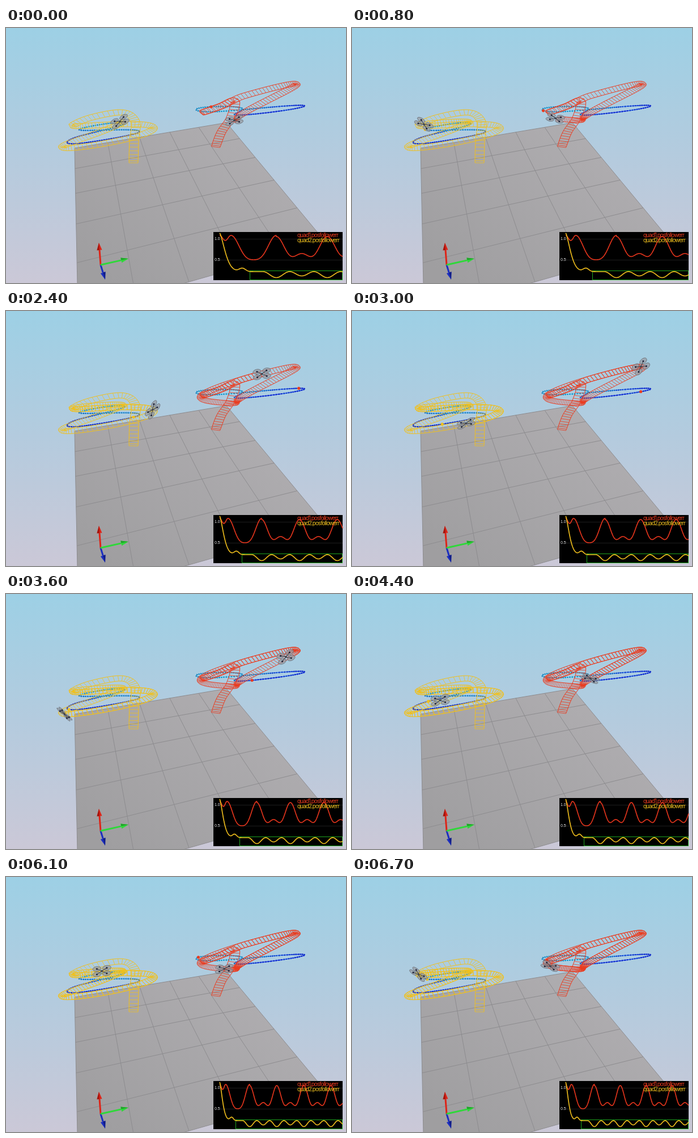
These frames come from a looping animation (600x450 px, 6.8 s). An HTML page with a canvas:

```html
<!DOCTYPE html>
<html lang="en">
<head>
<meta charset="utf-8">
<title>Quadrotor position following</title>
<style>
html, body { margin: 0; width: 100%; height: 100%; overflow: hidden; }
canvas { display: block; width: 600px; height: 450px; }
</style>
</head>
<body>
<canvas id="stage" width="600" height="450"></canvas>
<script>
const LOOP = 6800, STEP = 100, LAP = 5.72, TAU = Math.PI * 2;
const RED = '#ea3c20', YELLOW = '#f0c01e';
const view = document.getElementById('stage').getContext('2d');
const backdrop = document.createElement('canvas');
backdrop.width = 600;
backdrop.height = 450;
let g = backdrop.getContext('2d');

// Smooth closed path through points evenly spaced in time.
function closedPath(points) {
  const n = points.length;
  return t => {
    let x = 0, y = 0;
    points.forEach((p, i) => {
      const h = Math.PI * (t / LAP - i / n), s = Math.sin(h);
      const w = Math.abs(s) < 1e-6 ? 1 : Math.sin(n * h) * Math.cos(h) / (n * s);
      x += w * p[0];
      y += w * p[1];
    });
    return [x, y];
  };
}

// Open spline through points, u counts points.
function openPath(points, u) {
  const at = i => points[Math.max(0, Math.min(points.length - 1, i))];
  const i = Math.floor(u), s = u - i;
  const [p, a, b, q] = [at(i - 1), at(i), at(i + 1), at(i + 2)];
  return [0, 1].map(k => a[k] + s / 2 * (b[k] - p[k]
    + s * (2 * p[k] - 5 * a[k] + 4 * b[k] - q[k]
    + s * (3 * (a[k] - b[k]) + q[k] - p[k]))));
}

// A craft climbs along "climb" and joins its lap at time "join".
function craft(color, climb, join, lapPoints, refPoints) {
  const lap = closedPath(lapPoints);
  const points = [...climb, lap(join), lap(join + .3)];
  const start = join - climb.length * .3;
  const pos = t => t < join ? openPath(points, (t - start) / .3) : lap(t);
  return { color, start, pos, lap, ref: closedPath(refPoints) };
}

const yellowCraft = craft(YELLOW,
  [[225, 238], [226, 200], [228, 165], [205, 149], [150, 158]], 1.1 - LAP,
  [[201, 165], [134, 169], [134, 173], [237, 170], [227, 192], [105, 212], [143, 192], [200, 170]],
  [[195, 167], [131, 178], [178, 180], [236, 183], [176, 197], [112, 204], [126, 192], [193, 175]]);
const redCraft = craft(RED,
  [[370, 210], [380, 184], [397, 158], [404, 128], [378, 138], [344, 150], [380, 138]], 2.145 - LAP,
  [[403, 163], [364, 160], [347, 148], [416, 121], [502, 99], [496, 110], [428, 145], [408, 161]],
  [[362, 139], [336, 145], [382, 147], [488, 138], [521, 140], [437, 152], [405, 151], [415, 141]]);

function line(points, color, width) {
  g.beginPath();
  points.forEach(p => g.lineTo(p[0], p[1]));
  g.strokeStyle = color;
  g.lineWidth = width;
  g.stroke();
}

function fillPoly(points, color) {
  g.beginPath();
  points.forEach(p => g.lineTo(p[0], p[1]));
  g.closePath();
  g.fillStyle = color;
  g.fill();
}

function dot([x, y], r, color) {
  g.beginPath();
  g.arc(x, y, r, 0, TAU);
  g.fillStyle = color;
  g.fill();
}

// Floor square seen in perspective, u to the right and v to the front.
function floorPoint(u, v) {
  const w = 1 + .1201 * u - .4364 * v;
  return [(121 + 314.7 * u - 49.4 * v) / w, (212 - 24.9 * u + 72 * v) / w];
}

function drawFloor() {
  const shade = g.createLinearGradient(400, 167, 180, 450);
  shade.addColorStop(0, '#afadb0');
  shade.addColorStop(1, '#9f9ea0');
  fillPoly([floorPoint(0, 0), floorPoint(1, 0), floorPoint(1, 1), floorPoint(0, 1)], shade);
  for (let k = 0; k < 1.1; k += .2) {
    line([floorPoint(k, 0), floorPoint(k, 1)], '#8d8c8f', 1);
    line([floorPoint(0, k), floorPoint(1, k)], '#8d8c8f', 1);
  }
}

function arrow(x, y, tipX, tipY, color, dark) {
  const len = Math.hypot(tipX - x, tipY - y);
  const dx = (tipX - x) / len, dy = (tipY - y) / len;
  const bx = tipX - dx * 13, by = tipY - dy * 13;
  line([[x, y], [bx, by]], color, 3);
  fillPoly([[tipX, tipY], [bx - dy * 4.5, by + dx * 4.5], [bx + dy * 4.5, by - dx * 4.5]], color);
  fillPoly([[tipX, tipY], [bx, by], [bx + dy * 4.5, by - dx * 4.5]], dark);
}

// Dotted reference lap, from cyan to blue.
function reference(path, blueness) {
  let last = path(0), gap = 0;
  for (let i = 1; i <= 500; i++) {
    const p = path(i / 500 * LAP);
    const k = Math.max(0, Math.min(1, blueness(...p)));
    line([last, p], `rgb(${70 - 50 * k},${215 - 160 * k},${250 - 20 * k})`, 1.7);
    gap += Math.hypot(p[0] - last[0], p[1] - last[1]);
    if (gap > 3.4) {
      dot(p, 1.2, k > .5 ? '#0b1fb4' : '#0a4f98');
      gap = 0;
    }
    last = p;
  }
}

function drawBackdrop() {
  const sky = g.createLinearGradient(0, 0, 0, 450);
  sky.addColorStop(0, '#9dd0e5');
  sky.addColorStop(.5, '#b4cbde');
  sky.addColorStop(1, '#cbc8d7');
  g.fillStyle = sky;
  g.fillRect(0, 0, 600, 450);
  drawFloor();
  reference(redCraft.ref, (x, y) => (x - 410) / 110 + (x > 403 && y > 146 ? .6 : 0));
  reference(yellowCraft.ref, (x, y) => (y - 176) / 14);
  arrow(167, 418, 175, 444, '#1c2ec0', '#101c86');
  arrow(167, 418, 164, 379, '#dd2418', '#a4150e');
  arrow(167, 418, 216, 407, '#2fd83a', '#1ea628');
}

// Wing tips left behind: rungs lie across the heading, flattened by the view.
function trail({ color, start, pos }, now) {
  const flat = .6, left = [], right = [];
  for (let t = start; t <= now; t += .045) {
    const [x, y] = pos(t), [x2, y2] = pos(t + .02);
    const vx = (x2 - x) / .02, vy = (y2 - y) / .02 / flat;
    const k = 8.5 / (Math.hypot(vx, vy) + 10);
    left.push([x - vy * k, y + vx * k * flat]);
    right.push([x + vy * k, y - vx * k * flat]);
  }
  line(left, color, 1);
  line(right, color, 1);
  left.forEach((p, i) => line([p, right[i]], color, .8));
}

// The rotor plane leans into the acceleration.
function drone({ lap }, t, size) {
  const h = .35, [x, y] = lap(t), p = lap(t - h), q = lap(t + h);
  const ax = (p[0] + q[0] - 2 * x) / h / h * .0025;
  const ay = (p[1] + q[1] - 2 * y) / h / h * .0025;
  const nx = ax, ny = ay - .85, nz = .5 + .8 * ay;
  const side = Math.hypot(nx, ny), tilt = nz / Math.hypot(side, nz);
  const long = [-ny / side, nx / side], short = [nx / side * tilt, ny / side * tilt];
  const arm = angle => [0, 1].map(k =>
    size * (Math.cos(angle) * long[k] + Math.sin(angle) * short[k]));
  const a = arm(.7), b = arm(.7 + TAU / 4);
  for (let i = 0; i < 4; i++) {
    const [dx, dy] = arm(.7 + i * TAU / 4), hub = [x + dx, y + dy];
    g.save();
    g.transform(...a, ...b, ...hub);
    g.beginPath();
    g.arc(0, 0, .6, 0, TAU);
    g.restore();
    g.fillStyle = 'rgba(152,157,165,.75)';
    g.fill();
    g.strokeStyle = '#666a71';
    g.lineWidth = .8;
    g.stroke();
    line([[x, y], hub], '#4a4e56', 1.1);
    dot(hub, 1.5, '#1d2238');
  }
  dot([x, y], 2, '#454953');
}

const beat = u => (u - 1) / .9 * TAU;
const wave = (a, main, twice) => 391.5 - main * Math.cos(a) - twice * Math.cos(2 * a);

function errRed(u) {
  if (u < .2) return 370.5 - 4.5 * Math.cos(u / .2 * TAU);
  return u < 1 ? wave((u - .2) / .8 * TAU, 21.5, 4) : wave(beat(u), 15, 8.5);
}

function errYellow(u) {
  if (u < .78) return 430 - 68 * Math.exp(-((u / .13) ** 1.5)) - 6 * Math.exp(-(((u - .4) / .08) ** 2));
  return 434.5 + 4.5 * Math.cos(2 * beat(u)) + 1.5 * Math.cos(beat(u));
}

function label(text, x, y, color, font, spacing) {
  g.font = font;
  g.letterSpacing = spacing;
  g.fillStyle = color;
  g.fillText(text, x, y);
}

// The time axis shrinks as more data comes in.
function chart(t) {
  const unit = 100 / (1 + .145 * t);
  g.fillStyle = '#000';
  g.fillRect(366, 360, 228, 85);
  for (const y of [372.5, 409.5]) line([[378, y], [594, y]], '#1d1d1d', 1);
  const plot = (f, color) => {
    const points = [];
    for (let x = 377; x <= 594; x += .5) points.push([x, f((x - 377) / unit)]);
    line(points, color, 1.7);
  };
  const left = Math.round(377 + .53 * unit) + .5;
  g.strokeStyle = '#1fa51f';
  g.lineWidth = 1;
  g.strokeRect(left, 428.5, 593.5 - left, 16);
  plot(errRed, '#e0341c');
  plot(errYellow, '#e8b81c');
  const small = '7px "Liberation Sans", Arial, sans-serif';
  const legend = '10px Inter, sans-serif';
  label('1.0', 368, 374, '#e8e8e8', small, '0px');
  label('0.5', 368, 411, '#e8e8e8', small, '0px');
  label('quad1.posfollowerr', 514, 369, RED, legend, '-1px');
  label('quad2.posfollowerr', 514, 378, YELLOW, legend, '-1px');
}

function draw(t) {
  g.drawImage(backdrop, 0, 0);
  for (const c of [yellowCraft, redCraft]) {
    trail(c, t);
    dot(c.ref(t), 2.6, c.color);
  }
  drone(yellowCraft, t, 12.5);
  drone(redCraft, t, 12);
  chart(t);
}

drawBackdrop();
g = view;
const begin = performance.now();
let shown = -1;
function tick() {
  const step = Math.floor(((performance.now() - begin) % LOOP) / STEP);
  if (step !== shown) {
    shown = step;
    draw(step * STEP / 1000);
  }
  requestAnimationFrame(tick);
}
tick();
</script>
</body>
</html>
```
